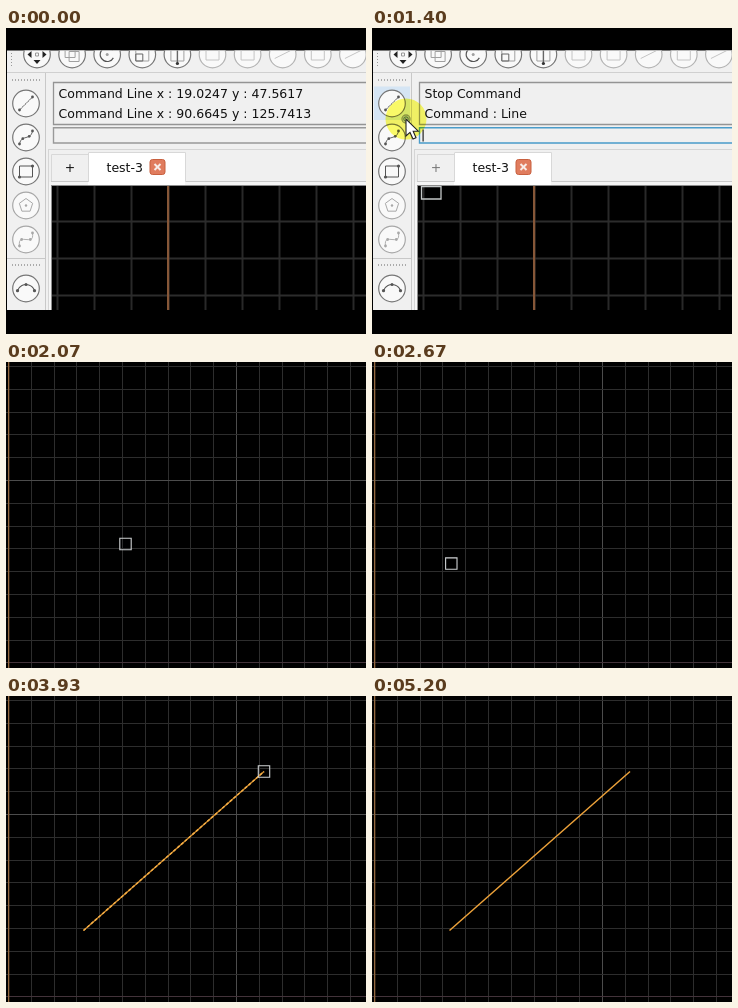
An HTML page with a canvas that plays this animation: 360 by 306 pixels, repeating every 5270 ms.

```html
<!DOCTYPE html>
<html lang="en">
<head>
<meta charset="utf-8">
<title>Drawing a line</title>
<style>
html, body { margin: 0; width: 100%; height: 100%; overflow: hidden; background: #000; }
canvas { display: block; width: 360px; height: 306px; }
</style>
</head>
<body>
<canvas id="stage" width="360" height="306"></canvas>
<script>
const ctx = document.getElementById('stage').getContext('2d');
const LOOP = 5270, STEP = 1000 / 15, CUT = 2070, CLICK = 1400;
const FONT = '12.5px "DejaVu Sans", sans-serif';
const START = [77.5, 234.5], END = [258, 75.5], CORNER = [59.5, 161];

// A move is a start point followed by eased legs
const toolMove = {
  from: [112, 276],
  legs: [
    { t0: 470, t1: 870, to: [36, 105] },
    { t0: 1000, t1: 1330, to: [34, 91] },
    { t0: 1530, t1: 1930, to: [153, 257] }
  ]
};
const drawMove = {
  from: [119.5, 182],
  legs: [
    { t0: 2200, t1: 2530, to: [80, 189] },
    { t0: 2600, t1: 3070, to: START },
    { t0: 3070, t1: 3200, to: [139, 161] },
    { t0: 3200, t1: 3930, to: END },
    { t0: 4930, t1: 5200, to: [353, 4] }
  ]
};

const easeOut = p => 1 - (1 - p) ** 2;
const clamp = p => Math.max(0, Math.min(1, p));

function pointAt({ from, legs }, t) {
  return legs.reduce(([x, y], { t0, t1, to }) => {
    const p = easeOut(clamp((t - t0) / (t1 - t0)));
    return [x + (to[0] - x) * p, y + (to[1] - y) * p];
  }, from);
}

function rect(x, y, w, h, color) {
  ctx.fillStyle = color;
  ctx.fillRect(x, y, w, h);
}
function stroke(color, width) {
  ctx.strokeStyle = color;
  ctx.lineWidth = width;
  ctx.stroke();
}
function frame(x, y, w, h, color, width = 1) {
  ctx.beginPath();
  ctx.rect(x, y, w, h);
  stroke(color, width);
}
function square(x, y, half, color, width = 1) {
  frame(x - half, y - half, half * 2, half * 2, color, width);
}
function path(points, color, width = 1) {
  ctx.beginPath();
  points.forEach(([x, y]) => ctx.lineTo(x, y));
  stroke(color, width);
}
function ring(x, y, r, color, width = 1, a0 = 0, a1 = Math.PI * 2) {
  ctx.beginPath();
  ctx.arc(x, y, r, a0, a1);
  stroke(color, width);
}
function disc(x, y, r, color) {
  ctx.beginPath();
  ctx.arc(x, y, r, 0, Math.PI * 2);
  ctx.fillStyle = color;
  ctx.fill();
}
function text(s, x, y, color = '#111') {
  ctx.font = FONT;
  ctx.fillStyle = color;
  ctx.fillText(s, x, y);
}
function clipped(x, y, w, h, draw) {
  ctx.save();
  ctx.beginPath();
  ctx.rect(x, y, w, h);
  ctx.clip();
  draw();
  ctx.restore();
}
const range = n => [...Array(n).keys()];

// Rising chain of n nodes that swings around the diagonal
function chain(n, swing, c) {
  const at = u => {
    const s = swing * Math.sin(u * Math.PI * 2);
    return [-6.5 + 13 * u - s, 6.5 - 13 * u - s];
  };
  path(range(13).map(i => at(i / 12)), c, 0.9);
  range(n).forEach(i => disc(...at(i / (n - 1)), 1.4, c));
}

// Glyphs are drawn around the button centre
const glyph = {
  move() {
    range(4).forEach(() => {
      ctx.rotate(Math.PI / 2);
      ctx.beginPath();
      ctx.moveTo(9.5, 0);
      ctx.lineTo(5.5, -3.5);
      ctx.lineTo(5.5, 3.5);
      ctx.fillStyle = '#222';
      ctx.fill();
    });
    square(0, 0, 1.5, '#999');
  },
  copy(c) { square(-2, -2, 5, c); square(2, 2, 5, c); },
  rotate(c) { ring(0, 0, 7, '#555', 1.2, 0.5, 5.6); disc(0, 0, 1.5, c); },
  scale(c) { square(0, 0, 6.5, c); square(-3, 3, 3.5, '#666'); },
  mirror(c) { square(0, 0, 6.5, c); rect(-0.7, -9, 1.4, 18, '#666'); disc(0, 9, 1.6, '#333'); },
  sheet(c) { square(0, -1, 6.5, c); },
  slash(c) { path([[-8, 4], [8, -4]], c); },
  line(c) { chain(2, 0, c); },
  polyline(c) { chain(4, 1.2, c); },
  box(c) { frame(-6.5, -5.5, 13, 11, c); disc(-6.5, 5.5, 1.6, c); disc(6.5, -5.5, 1.6, c); },
  polygon(c) {
    path(range(6).map(i => {
      const a = (i * 0.4 - 0.5) * Math.PI;
      return [7 * Math.cos(a), 7 * Math.sin(a)];
    }), c);
    disc(0, 0, 1.2, c);
  },
  spline(c) { chain(4, 2.5, c); },
  arc(c) {
    ring(0, 5, 9, c, 1.1, Math.PI * 1.1, Math.PI * 1.9);
    [-8.5, 8.5].forEach(x => disc(x, 2.2, 1.6, c));
    disc(0, -4, 1.5, c);
  }
};
function button(x, y, name, ink, edge) {
  disc(x, y, 13.3, '#f9f9f9');
  ring(x, y, 13.3, edge, 1.2);
  ctx.save();
  ctx.translate(x, y);
  glyph[name](ink);
  ctx.restore();
}

const topTools = ['move', 'copy', 'rotate', 'scale', 'mirror', 'sheet', 'sheet', 'slash', 'sheet', 'slash'];
const sideTools = ['line', 'polyline', 'box', 'polygon', 'spline'];

function toolbars(hover) {
  for (let y = 25; y < 40; y += 3) rect(5, y, 1, 1, '#999');
  topTools.forEach((name, i) =>
    button(31 + i * 35.1, 26.5, name, i > 4 ? '#c4c4c4' : '#a0a0a0', i > 4 ? '#b4b4b4' : '#777'));
  rect(1, 44, 359, 1, '#d0d0d0');
  rect(39, 45, 1, 237, '#c8c8c8');
  rect(1, 230, 38, 1, '#c8c8c8');
  for (const y of [51, 236]) {
    for (let x = 6; x < 36; x += 3) rect(x, y, 1, 2, '#aaa');
  }
  if (hover >= 0) rect(2, 58.5 + hover * 34, 36, 33.5, '#d5e5f4');
  sideTools.forEach((name, i) =>
    button(20, 75.5 + i * 34, name, i > 2 ? '#a8a8a8' : '#555', i > 2 ? '#a8a8a8' : '#777'));
  button(20, 260.5, 'arc', '#555', '#777');
}

function closeButton(x, y) {
  ctx.beginPath();
  ctx.roundRect(x - 7.5, y - 7.5, 15, 15, 2.5);
  ctx.fillStyle = '#e07c5e';
  ctx.fill();
  stroke('#c8603f', 1);
  for (const s of [-3, 3]) path([[x - 3, y - s], [x + 3, y + s]], '#f8ece8', 2);
}

function panels(t) {
  const active = t >= CLICK;
  const lines = active ? ['Stop Command', 'Command : Line']
    : ['Command Line x : 19.0247 y : 47.5617', 'Command Line x : 90.6645 y : 125.7413'];
  frame(47.5, 54.5, 320, 42, '#949494', 1.3);
  lines.forEach((s, i) => text(s, 52.5, 70 + i * 20));
  frame(47.5, 99.7, 320, 15.3, active ? '#4a9cca' : '#999', 1.4);
  if (active) rect(50.5, 101.5, 1.2, 12, '#222');
  rect(42, 121, 318, 1, '#d5d5d5');
  rect(42, 121, 1, 161, '#d5d5d5');

  frame(45.5, 126.5, 37, 27, '#d8d8d8');
  rect(43, 154, 317, 128, '#f5f5f5');
  rect(45, 153, 315, 1, '#c8c8c8');
  rect(45, 157, 315, 1, '#8c8c8c');
  rect(45, 157, 1, 125, '#8c8c8c');
  rect(82, 124, 97, 33, '#fff');
  path([[82.5, 154], [82.5, 124.5], [179.5, 124.5], [179.5, 154]], '#d8d8d8');
  text('+', 58.8, 144, active ? '#777' : '#111');
  text('test-3', 100.5, 144);
  closeButton(151.5, 139);
}

function viewport(box) {
  clipped(46, 158, 314, 124, () => {
    rect(46, 158, 314, 124, '#000');
    for (let x = 50.5; x < 360; x += 37) rect(x, 158, 2, 124, '#292929');
    for (let y = 192.5; y < 282; y += 37) rect(46, y, 314, 2, '#2c2c2c');
    rect(161, 158, 2.2, 124, '#865738');
    if (!box) return;
    const y = Math.max(box[1] - 9.5, 158.5);
    frame(box[0] - 10, y, 19.5, box[1] + 10 - y, '#c4c8c8', 1.3);
  });
}

function ripple([x, y], t, from) {
  const p = (t - from) / 450;
  if (p < 0 || p >= 1) return;
  ctx.globalAlpha = 1 - p * p;
  ring(x, y, 4 + 8 * p, '#8a9440', 1.4);
  ring(x, y, 2.2, '#5c7a3a', 1.2);
  ctx.globalAlpha = 1;
}

// Multiplying keeps the halo invisible over the black viewport
function halo(x, y) {
  ctx.globalCompositeOperation = 'multiply';
  disc(x, y, 20.5, '#ffff6a');
  ctx.globalCompositeOperation = 'source-over';
}

function arrow(x, y) {
  ctx.save();
  ctx.translate(x, y);
  ctx.beginPath();
  [[0, 0], [0, 17], [4, 13.4], [7, 20], [10, 18.7], [7.2, 12.2], [12.3, 12.2]]
    .forEach(p => ctx.lineTo(...p));
  ctx.closePath();
  ctx.fillStyle = '#fff';
  ctx.fill();
  stroke('#222', 1.1);
  ctx.restore();
}

function toolScene(t) {
  const tip = pointAt(toolMove, t), [x, y] = tip;
  const shown = t >= 470;
  const inView = x > 46 && y > 158;
  const hover = shown && x < 39 ? Math.floor((y - 58) / 34) : -1;
  clipped(1, 22.5, 359, 259.5, () => {
    rect(1, 22, 359, 260, '#f0f0f0');
    toolbars(hover);
    panels(t);
    viewport(shown && (inView ? tip : CORNER));
    if (!shown) return;
    halo(x, y);
    ripple([34, 91], t, CLICK);
    if (!inView) arrow(x, y);
  });
}

function drawScene(t) {
  const cell = 22.8, dim = '#2d2d2d', bright = '#4c4c4c';
  range(16).forEach(i => rect(Math.round(2 + i * cell), 0, 1, 306, i === 10 ? bright : dim));
  range(14).forEach(i => rect(0, Math.round(4 + i * cell), 360, 1, i === 5 ? bright : dim));
  rect(0, 300, 360, 1, '#43333a');
  rect(2, 0, 1.3, 306, '#94683f');

  const tip = pointAt(drawMove, t);
  if (t >= 4400) {
    path([START, END], '#eda23a', 1.5);
  } else if (t >= 3130) {
    path([START, tip], '#d48f30', 1.3);
    ctx.setLineDash([3, 2]);
    path([START, tip], '#f5ae45', 1.5);
    ctx.setLineDash([]);
  }
  ripple(START, t, 3070);
  ripple(END, t, 4330);
  if (t < 5200) square(...tip, 5.7, '#cfd2d4', 1.1);
}

function render(now) {
  const k = Math.floor((now % LOOP + 3.4) / STEP);
  const t = Math.round(k * STEP / 10) * 10 % LOOP;
  rect(0, 0, 360, 306, '#000');
  (t < CUT ? toolScene : drawScene)(t);
}

let origin;
function tick(now) {
  origin ??= now;
  render(now - origin);
  requestAnimationFrame(tick);
}
render(0);
requestAnimationFrame(tick);
</script>
</body>
</html>
```
